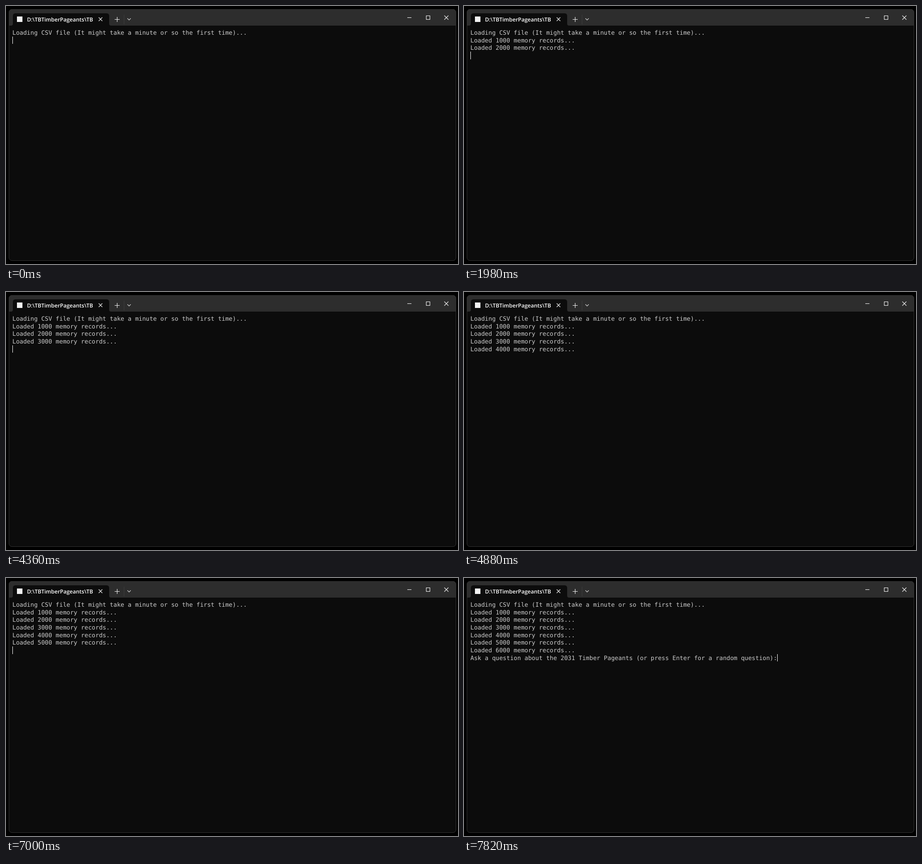
An HTML page for the animation above (8 s loop, 990 px wide and 566 px high).

```html
<!DOCTYPE html>
<html lang="en">
<head>
<meta charset="utf-8">
<title>Terminal</title>
<style>
  html, body { margin: 0; width: 100%; height: 100%; overflow: hidden; background: #000; }
  svg { display: block; width: 990px; height: 566px; }
  text { text-rendering: geometricPrecision; white-space: pre; }
  .mono { font: 13.132px "DejaVu Sans Mono", monospace; fill: #ccc; }
  .title { font: 600 12px "Open Sans", "Noto Sans", sans-serif; fill: #fff; }
  .icon { fill: none; stroke: #f2f2f2; stroke-width: 1.1; }
</style>
</head>
<body>
<svg viewBox="0 0 990 566">
  <clipPath id="frame"><rect x="6" y="7" width="980" height="552" rx="7"/></clipPath>
  <clipPath id="label"><rect x="46" y="18" width="144" height="24"/></clipPath>

  <g clip-path="url(#frame)">
    <rect x="6" y="7" width="980" height="552" fill="#0c0c0c"/>
    <rect x="6" y="7" width="980" height="36" fill="#2d2d2d"/>
  </g>
  <rect x="6.5" y="7.5" width="979" height="551" rx="6.5" fill="none" stroke="#333"/>

  <path d="M11 43 Q15 43 15 39 V22 Q15 16 21 16 H220 Q226 16 226 22 V39 Q226 43 230 43 Z" fill="#0c0c0c"/>
  <rect x="24" y="23" width="12" height="12" fill="#f2f2f2"/>
  <text class="title" x="46" y="34" clip-path="url(#label)">D:\TBTimberPageants\TBTimber</text>

  <g class="icon">
    <path d="M203 25 l8 8 m0 -8 l-8 8"/>
    <path d="M238 29.5 h11 M243.5 24 v11"/>
    <path d="M266 27.2 l3.6 3.6 l3.6 -3.6"/>
    <path d="M879 25.5 h9"/>
    <rect x="920.5" y="21.5" width="8" height="8"/>
    <path d="M960 21 l9 9 m0 -9 l-9 9"/>
  </g>
  <path d="M258.5 19 V40" stroke="#3d3d3d"/>

  <g id="screen"></g>
  <rect id="cursor" width="1" fill="#fff"/>
</svg>

<script>
const LOOP = 8000;
const LEFT = 14, TOP = 50, ROW = 16.67, CELL = 7.906, BASE = 13;
const PROMPT = "Ask a question about the 2031 Timber Pageants (or press Enter for a random question):";

// Every print shows the cursor; every blink flips it.
const prints = [580, 1980, 3460, 4760, 6140, 7550, 7820];
const blinks = [1140, 1570, 2130, 2650, 3210, 3840, 4360, 4880, 5460, 6020, 6440, 7000];

const lines = ["Loading CSV file (It might take a minute or so the first time)..."];
for (let n = 1; n <= 6; n++) lines.push(`Loaded ${n * 1000} memory records...`);
lines.push(PROMPT);

const screen = document.getElementById("screen");
const cursor = document.getElementById("cursor");

const rows = lines.map((line, i) => {
  const row = document.createElementNS("http://www.w3.org/2000/svg", "text");
  row.setAttribute("class", "mono");
  row.setAttribute("x", LEFT);
  row.setAttribute("y", Math.round(TOP + BASE + i * ROW));
  row.textContent = line;
  screen.append(row);
  return row;
});

function draw(t) {
  const done = prints.filter(p => p <= t);
  const last = done.length ? done[done.length - 1] : 0;
  const flips = blinks.filter(b => b > last && b <= t).length;
  const count = done.length + 1;
  const asking = count === lines.length;

  rows.forEach((row, i) => row.setAttribute("visibility", i < count ? "visible" : "hidden"));

  const line = asking ? count - 1 : count;
  const y = Math.round(TOP + line * ROW);
  cursor.setAttribute("x", asking ? Math.round(LEFT + PROMPT.length * CELL) : LEFT);
  cursor.setAttribute("y", y);
  cursor.setAttribute("height", Math.round(TOP + (line + 1) * ROW) - y);
  cursor.setAttribute("visibility", flips % 2 ? "hidden" : "visible");
}

function tick() {
  draw(performance.now() % LOOP);
  requestAnimationFrame(tick);
}
tick();
</script>
</body>
</html>
```
